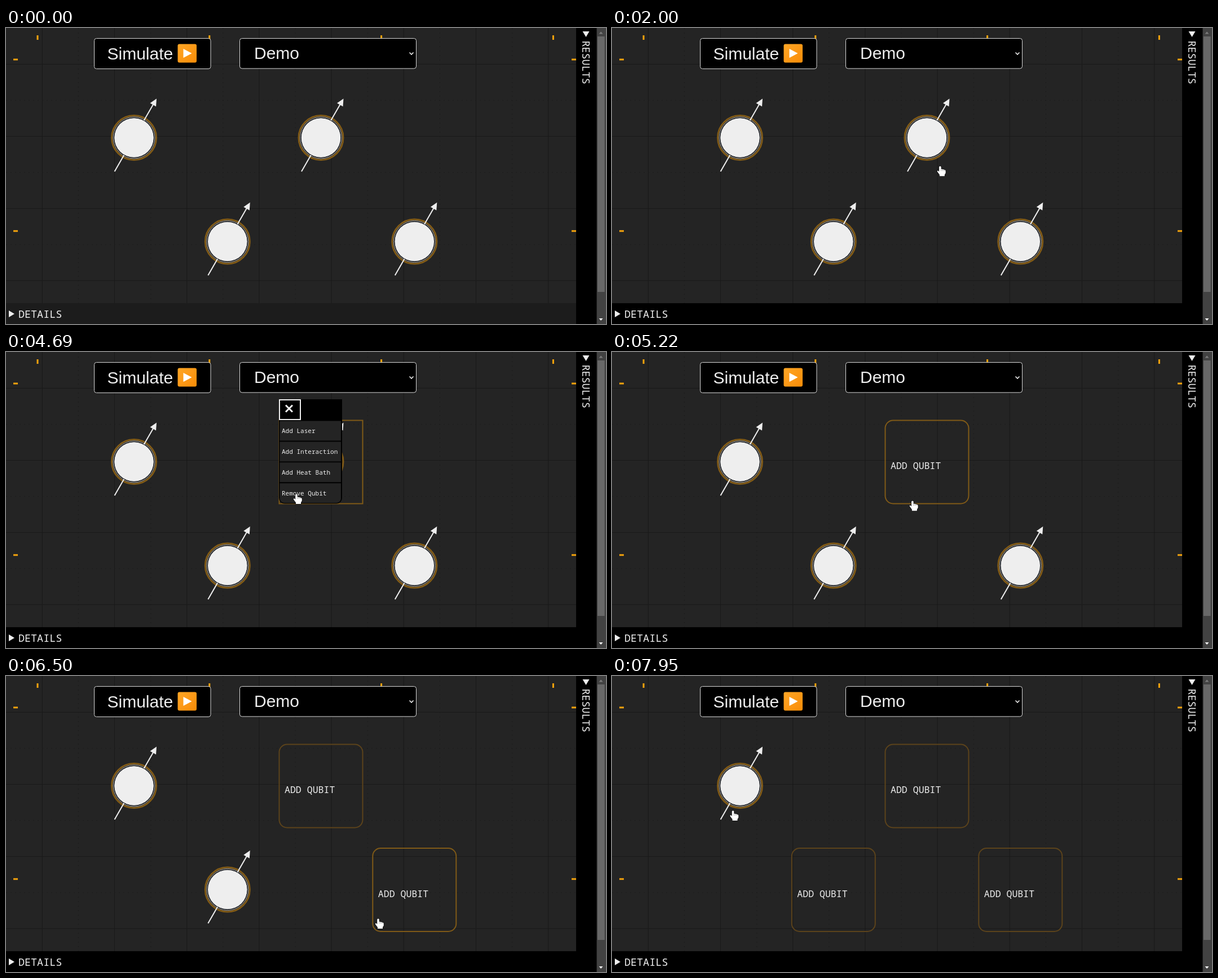
These frames come from a looping animation (1064x526 px, 8 s). An HTML page with a canvas:

```html
<!DOCTYPE html>
<html lang="en">
<head>
<meta charset="utf-8">
<title>Qubit editor</title>
<style>
html, body { margin: 0; width: 100%; height: 100%; overflow: hidden; background: #242424; }
canvas { display: block; width: 1064px; height: 526px; }
</style>
</head>
<body>
<canvas id="stage" width="1064" height="526"></canvas>
<script>
const ctx = document.getElementById('stage').getContext('2d');
const LOOP = 8000;
const MONO = '"Noto Sans Mono", "DejaVu Sans Mono", monospace';
const SANS = '"Liberation Sans", Arial, sans-serif';
const BG = '#242424', LIGHT = '#eeeeee', AMBER = '#f5a30c';
const RING = '#805a17', DIM = '#5c431b';
const HALF = 74;

const qubits = [
  { x: 227, y: 195 },
  { x: 558.5, y: 195, menu: 2970, removed: 4940 },
  { x: 392.8, y: 379.5, menu: 7090, removed: 7620 },
  { x: 724.3, y: 379.5, menu: 5800, removed: 6500 }
];

// Pointer moves: start and end time, step count, curve points.
// "lead" means the first step is a click before the pointer moves.
const moves = [
  { t0: 380, t1: 700, n: 5, path: [[590, 515], [592, 380], [604.5, 314]] },
  { t0: 1680, t1: 2240, n: 8, path: [[604.5, 314], [590, 265], [569.5, 212]] },
  { t0: 3470, t1: 3950, n: 7, path: [[569.5, 212], [433, 150], [499, 106]] },
  { t0: 4200, t1: 4360, n: 3, path: [[499, 106], [508, 200], [514, 289]] },
  { t0: 4530, t1: 4690, n: 3, path: [[514, 289], [515, 270], [515, 252]] },
  { t0: 5090, t1: 5800, n: 10, path: [[515, 252], [600, 310], [699.5, 374]] },
  { t0: 5970, t1: 6360, n: 6, path: [[699.5, 374], [682, 402], [660, 431]] },
  { t0: 6500, t1: 6920, n: 6, lead: true, path: [[660, 431], [525, 410], [394.5, 380]] },
  { t0: 7090, t1: 7390, n: 5, lead: true, path: [[394.5, 380], [378, 405], [362, 431]] },
  { t0: 7620, t1: 7950, n: 5, lead: true, path: [[362, 431], [200, 300], [214.5, 239]] }
];

function pointerAt(t) {
  const move = moves.filter(m => t >= m.t0).pop();
  if (!move) return null;
  const { t0, t1, n, lead, path: [a, b, c] } = move;
  const step = Math.min(n - 1, Math.floor((t - t0) / (t1 - t0) * (n - 1) + 1e-6));
  const u = lead ? step / (n - 1) : (step + 1) / n;
  const e = u * u * (3 - 2 * u);
  const mix = i => (1 - e) ** 2 * a[i] + 2 * e * (1 - e) * b[i] + e * e * c[i];
  return { x: mix(0), y: mix(1) };
}

const isOpen = (q, t) => t >= q.menu && t < q.removed;
const inBox = (q, p) => p && Math.abs(p.x - q.x) <= HALF && Math.abs(p.y - q.y) <= HALF;
const inHeader = (q, p) =>
  p.x > q.x - HALF && p.x < q.x + 37 && p.y > q.y - 111 && p.y <= q.y - HALF;

function line(points, color, width = 1, dash = []) {
  ctx.beginPath();
  points.forEach(([x, y]) => ctx.lineTo(x, y));
  ctx.setLineDash(dash);
  ctx.strokeStyle = color;
  ctx.lineWidth = width;
  ctx.stroke();
  ctx.setLineDash([]);
}

function poly(points, color) {
  ctx.beginPath();
  points.forEach(([x, y]) => ctx.lineTo(x, y));
  ctx.closePath();
  ctx.fillStyle = color;
  ctx.fill();
}

function box(x, y, w, h, r, fill, stroke, width = 1) {
  ctx.beginPath();
  ctx.roundRect(x, y, w, h, r);
  if (fill) { ctx.fillStyle = fill; ctx.fill(); }
  if (stroke) { ctx.strokeStyle = stroke; ctx.lineWidth = width; ctx.stroke(); }
}

function rect(x, y, w, h, color) {
  ctx.fillStyle = color;
  ctx.fillRect(x, y, w, h);
}

function text(str, x, y, size, family = MONO, color = LIGHT) {
  ctx.font = `${size}px ${family}`;
  ctx.fillStyle = color;
  ctx.fillText(str, x, y);
}

function circle(x, y, r) {
  ctx.beginPath();
  ctx.arc(x, y, r, 0, Math.PI * 2);
}

function drawGrid() {
  rect(0, 0, 1064, 526, BG);
  for (let i = 1; i <= 15; i++) {
    const p = i * 64.1 + 0.2, major = i % 2;
    const color = major ? '#191919' : '#1d1d1d';
    const dash = major ? [] : [2, 6];
    line([[p, 0], [p, 489]], color, 1, dash);
    if (i < 8) line([[0, p], [1011, p]], color, 1, dash);
  }
  for (let i = 0; i < 4; i++) {
    const p = 56 + i * 304.8;
    rect(p - 1.5, 13, 3, 8, AMBER);
    if (i < 2) {
      rect(13, p - 1.5, 8, 3, AMBER);
      rect(1003, p - 1.5, 8, 3, AMBER);
    }
  }
}

function drawQubit(q) {
  ctx.save();
  ctx.translate(q.x, q.y);
  circle(0, 0, 39.5);
  ctx.strokeStyle = RING;
  ctx.lineWidth = 3;
  ctx.stroke();
  circle(0, 0, 37);
  ctx.strokeStyle = '#a9a9a9';
  ctx.lineWidth = 1;
  ctx.stroke();
  line([[-34.5, 60], [34.5, -60]], LIGHT, 2);
  poly([[40, -69.5], [39, -55.5], [28.5, -61.5]], LIGHT);
  circle(0, 0, 35.3);
  ctx.fillStyle = LIGHT;
  ctx.fill();
  ctx.strokeStyle = '#20242a';
  ctx.lineWidth = 1;
  ctx.stroke();
  ctx.restore();
}

function drawSlot(q, hovered) {
  box(q.x - HALF, q.y - HALF + 0.5, 148, 148, 14, null, hovered ? RING : DIM, 2);
  text('ADD QUBIT', q.x - 64.5, q.y + 13, 16.56);
}

function drawMenu(q) {
  box(q.x - HALF, q.y - HALF + 0.5, 148, 148, 0, null, RING, 2);
  ctx.save();
  ctx.translate(Math.round(q.x - 74.5), Math.round(q.y - 111));
  box(0, 0, 112, 185.5, [0, 0, 10, 10], '#000');
  box(1, 1, 37, 35, 0, '#000', LIGHT, 2);
  line([[12, 10.5], [24, 22.5]], LIGHT, 3);
  line([[24, 10.5], [12, 22.5]], LIGHT, 3);
  ['Add Laser', 'Add Interaction', 'Add Heat Bath', 'Remove Qubit'].forEach((label, i) => {
    const y = 38.5 + i * 36.9;
    box(1.5, y, 108.5, 35, i === 3 ? [0, 0, 8, 8] : 0, BG);
    text(label, 5, y + 21.5, 11.04);
  });
  ctx.restore();
}

function drawToolbar() {
  box(156.5, 18.5, 206.5, 54, 4, '#000', '#d8d8d8');
  text('Simulate', 179.5, 55.5, 30, SANS);
  const glow = ctx.createLinearGradient(304, 28, 338, 62);
  glow.addColorStop(0, '#ffa726');
  glow.addColorStop(1, '#f98c08');
  box(304.5, 28.5, 33.5, 33, 3, glow);
  poly([[314.5, 37], [329.5, 45], [314.5, 53]], '#fff');

  box(414.5, 18.5, 313, 53.5, 4, '#000', '#d8d8d8');
  text('Demo', 440, 55, 30, SANS);
  line([[715.5, 43.5], [719, 47], [722.5, 43.5]], LIGHT, 1.6);
}

function drawPanels(barHovered) {
  rect(0, 489, 1011, 37, barHovered ? '#1c1c1c' : '#000');
  poly([[5, 502], [15, 508], [5, 514]], LIGHT);
  text('DETAILS', 22, 514.5, 18.4);

  rect(1011, 0, 37, 526, '#000');
  poly([[1022.5, 6], [1034.5, 6], [1028.5, 16]], LIGHT);
  ctx.save();
  ctx.translate(1022, 22.5);
  ctx.rotate(Math.PI / 2);
  text('RESULTS', 0, 0, 18.4);
  ctx.restore();

  rect(1047.5, 0, 16.5, 526, '#424242');
  rect(1049, 15, 12.5, 454, '#686868');
  poly([[1051.5, 10.5], [1055, 6.5], [1058.5, 10.5]], '#7c7c7c');
  poly([[1051.5, 516], [1058.5, 516], [1055, 520]], '#f4f4f4');
}

const arrowShape = new Path2D(
  'M0 0V16L3.9 12.6L6.6 18.8L9.2 17.7L6.6 11.6H11.8Z');
const handShape = new Path2D(
  'M-1.8 1.5Q0 -1 1.8 1.5V6Q3.4 4.6 4.6 6.4Q6.2 5.2 7.2 7Q9.6 6.4 9.8 9' +
  'V12.5L8 15.5V18H-1V15.5L-5 10.2Q-5.8 8 -3.6 8.3L-1.8 10Z');

function drawPointer(p, hand) {
  ctx.save();
  ctx.translate(p.x, p.y);
  ctx.lineJoin = 'round';
  ctx.lineWidth = hand ? 1.6 : 1.4;
  ctx.strokeStyle = hand ? '#111' : '#fff';
  ctx.fillStyle = hand ? '#fff' : '#1a1a1a';
  const shape = hand ? handShape : arrowShape;
  ctx.stroke(shape);
  ctx.fill(shape);
  if (hand) {
    for (const x of [2, 4.8, 7.4]) line([[x, 6.5], [x, 9]], '#777', 0.7);
  }
  ctx.restore();
}

function draw(t) {
  const p = pointerAt(t);
  drawGrid();
  qubits.forEach(q => {
    if (t >= q.removed) drawSlot(q, inBox(q, p));
    else drawQubit(q);
  });
  qubits.filter(q => isOpen(q, t)).forEach(drawMenu);
  drawToolbar();
  drawPanels(t < 380);
  if (p) {
    const hand = qubits.some(q => inBox(q, p) || (isOpen(q, t) && inHeader(q, p)));
    drawPointer(p, hand);
  }
}

const start = performance.now();
function tick() {
  draw((performance.now() - start) % LOOP);
  requestAnimationFrame(tick);
}
tick();
</script>
</body>
</html>
```
